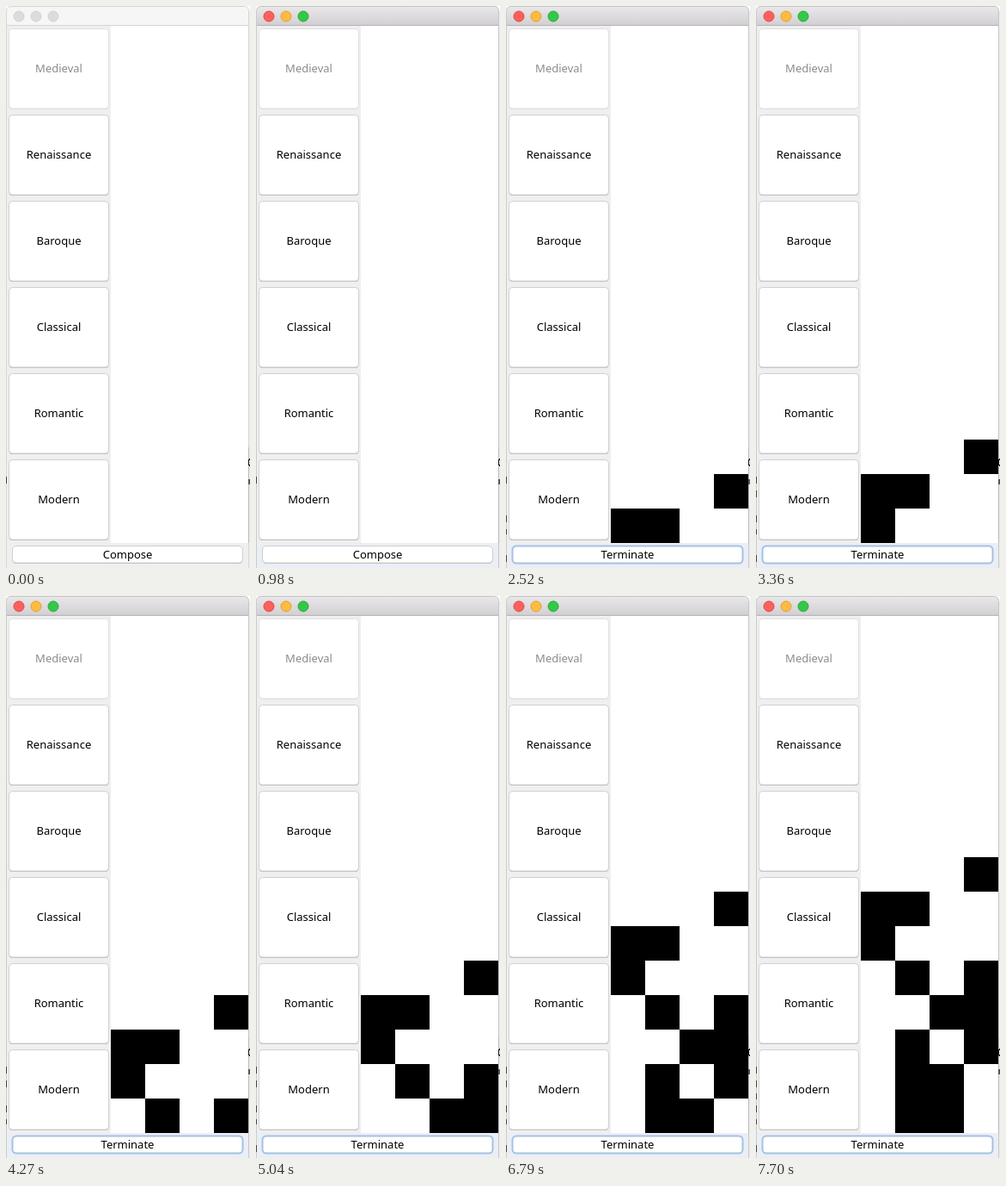
An HTML page with a canvas that plays this animation: 284x652 px, repeating every 8000 ms.

```html
<!DOCTYPE html>
<html lang="en">
<head>
<meta charset="utf-8">
<style>
html, body { margin: 0; width: 284px; height: 652px; overflow: hidden; background: #fff; }
canvas { display: block; }
</style>
</head>
<body>
<canvas id="stage" width="284" height="652"></canvas>
<script>
const ctx = document.getElementById('stage').getContext('2d');
const LOOP = 8000, ACTIVATE = 980, START = 1050;
const CELL = 40, GRID_X = 122, GRID_BOTTOM = 623;
const eras = ['Medieval', 'Renaissance', 'Baroque', 'Classical', 'Romantic', 'Modern'];

// Each row enters at the bottom and pushes the earlier ones up.
const rows = [
  [1260, '...#'], [2240, '##..'], [3150, '#...'], [4060, '.#.#'],
  [4900, '..##'], [5810, '.#.#'], [6650, '.##.'], [7560, '.##.']
];

// Slivers of the page behind the window: top, height, visible from, until.
const slivers = [
  [546, 8, 0, LOOP], [562, 8, 3360, 5250], [562, 8, 5950, LOOP],
  [577, 7, 7700, LOOP], [591, 8, 2450, LOOP], [607, 6, 2450, LOOP],
  [637, 8, 2450, 4200], [637, 8, 5040, LOOP]
];

function rect(x, y, w, h, color) {
  ctx.fillStyle = color;
  ctx.fillRect(x, y, w, h);
}

function rounded(x, y, w, h, r, fill, stroke, line = 1) {
  ctx.beginPath();
  ctx.roundRect(x, y, w, h, r);
  ctx.fillStyle = fill;
  ctx.fill();
  if (!stroke) return;
  ctx.strokeStyle = stroke;
  ctx.lineWidth = line;
  ctx.stroke();
}

function label(text, x, baseline, color = '#000') {
  ctx.fillStyle = color;
  ctx.fillText(text, x, baseline);
}

function vertical(y0, y1, top, bottom) {
  const g = ctx.createLinearGradient(0, y0, 0, y1);
  g.addColorStop(0, top);
  g.addColorStop(1, bottom);
  return g;
}

function drawTitleBar(active) {
  const fill = active ? vertical(1, 22, '#e9e7e9', '#d2d0d2') : '#f6f6f6';
  rounded(0.5, 0.5, 282, 24, [5, 5, 0, 0], fill, active ? '#c4c4c4' : '#d5d5d5');
  rect(1, 22, 281, 1, active ? '#b4b2b4' : '#d5d5d5');
  const lights = active
    ? [['#fc605c', '#e2463f'], ['#fdbc40', '#e0a032'], ['#34c84a', '#24ab35']]
    : Array(3).fill(['#dcdcdc', '#d2d2d2']);
  lights.forEach(([fill, edge], i) => rounded(9 + 20 * i, 6, 12, 12, 6, fill, edge));
}

function drawEras() {
  rect(1, 23, 121, 600, '#efefef');
  eras.forEach((name, i) => {
    const y = 26 + 100 * i, off = i === 0;
    rounded(3.5, y + 1, 116, 93, 4, off ? '#e2e2e2' : '#bdbdbd');
    rounded(3.5, y + 0.5, 116, 92.5, 4, '#fff', off ? '#e0e0e0' : '#d0d0d0');
    label(name, 61.5, y + 51, off ? '#8c8c8c' : '#000');
  });
}

function drawCells(t) {
  const shown = rows.filter(([at]) => t >= at);
  shown.forEach(([, cells], i) => {
    const y = GRID_BOTTOM - CELL * (shown.length - i);
    [...cells].forEach((c, col) => {
      if (c === '#') rect(GRID_X + CELL * col, y, CELL, CELL, '#000');
    });
  });
}

function drawFooter(active, running) {
  rect(1, 623, 282, 29, active ? '#ebeef5' : '#efefef');
  if (running) {
    rounded(7.5, 626.5, 268, 20, 4.5, '#fff', '#a3c2e3', 2);
  } else {
    rounded(7.5, 627.5, 268, 19.5, 4.5, '#bdbdbd');
    rounded(7.5, 626.5, 268, 19.5, 4.5, '#fff', '#cfcfcf');
  }
  label(running ? 'Terminate' : 'Compose', 141.5, 641);
}

function drawEdges(t, active) {
  rect(0, 6, 1, 646, active ? '#cbcbcb' : '#d8d8d8');
  rect(282, 6, 1, 646, active ? '#c6c6c6' : '#d5d5d5');
  rect(283, 6, 1, 646, '#eeeeee');
  rect(282, 512, 1, 111, '#b8b8b8');
  slivers.forEach(([y, h, from, to]) => {
    if (t >= from && t < to) rect(0, y, 1, h, '#4a4542');
  });
  rect(282, 526, 1, 7, '#111');
  rect(283, 525, 1, 2, '#111');
  rect(283, 532, 1, 2, '#111');
  rect(282, 549, 2, 6, '#555');
}

function draw(t) {
  const active = t >= ACTIVATE, running = t >= START;
  rect(0, 0, 284, 652, '#fff');
  ctx.font = '13px "Noto Sans", "Open Sans", sans-serif';
  ctx.textAlign = 'center';
  drawTitleBar(active);
  rect(122, 23, 160, 600, '#fff');
  drawEras();
  drawCells(t);
  drawFooter(active, running);
  drawEdges(t, active);
}

const begin = performance.now();
function tick() {
  draw((performance.now() - begin) % LOOP);
  requestAnimationFrame(tick);
}
tick();
</script>
</body>
</html>
```
